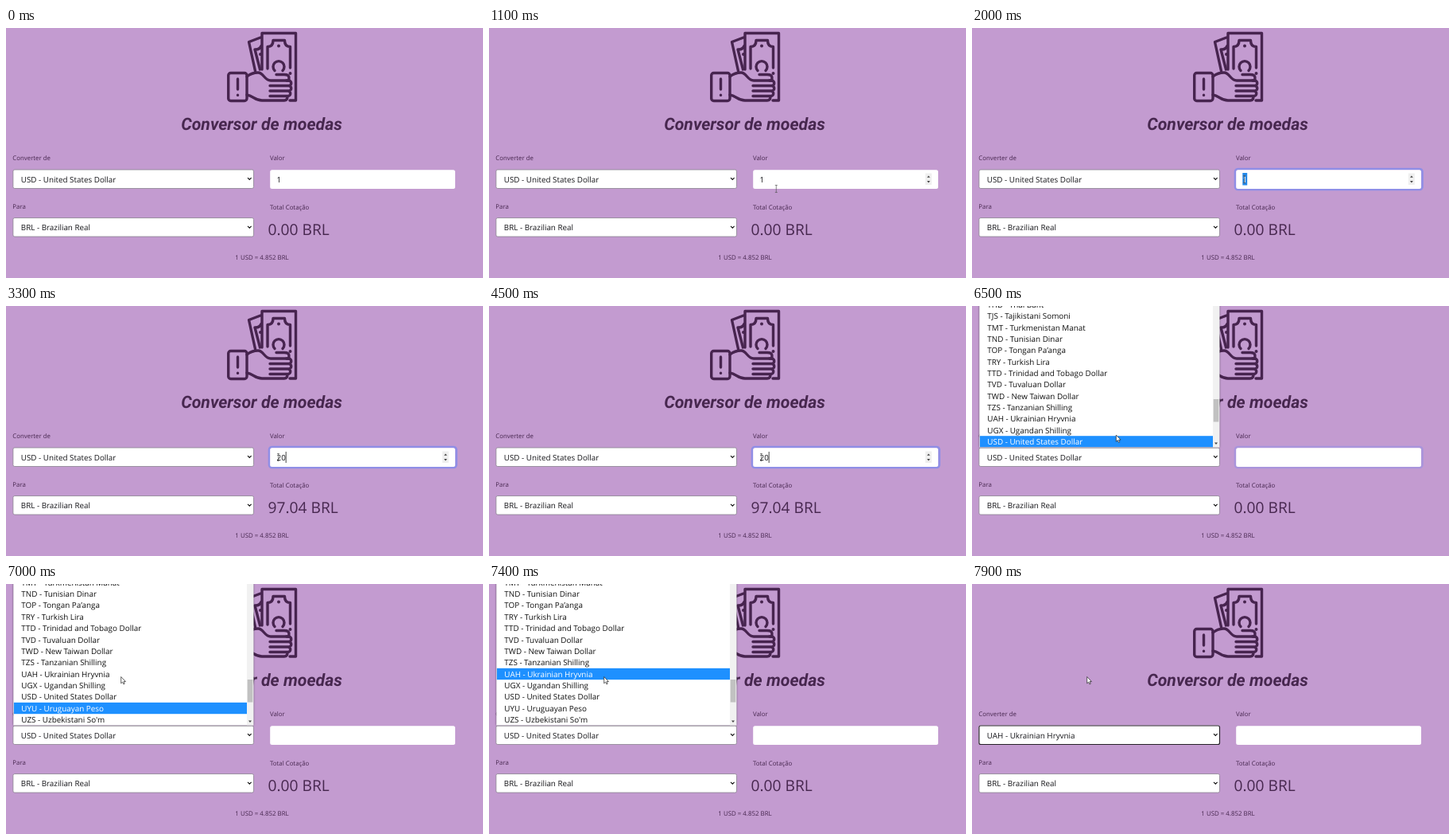
An HTML page that plays this animation: 600x314 px, repeating every 8 s.

```html
<!DOCTYPE html>
<html lang="pt-BR">
<head>
<meta charset="utf-8">
<title>Conversor de moedas</title>
<style>
html, body { margin: 0; width: 100%; height: 100%; overflow: hidden; background: #c39bd0; }
svg { display: block; width: 600px; height: 314px; }
text { font-family: "Open Sans", "Noto Sans", sans-serif; fill: #47274f; white-space: pre; text-rendering: geometricPrecision; }
.title { font: italic bold 21.25px Roboto, sans-serif; text-anchor: middle; }
.label { font-size: 7.85px; }
.rate { font-size: 7.9px; text-anchor: middle; }
.total { font-size: 19.2px; }
.field { font-size: 9.85px; fill: #16161a; }
.item { font-size: 9.9px; fill: #111; }
.item.on { fill: #fff; }
.icon { fill: none; stroke: #47244f; stroke-width: 3.4; stroke-linecap: round; stroke-linejoin: round; }
.chevron { fill: none; stroke: #111; stroke-width: 1.2; }
.select { fill: #fff; stroke: #8a8290; stroke-width: .8; }
.select.on { stroke: #262029; stroke-width: 1.2; filter: drop-shadow(0 0 .6px #fff); }
.panel { fill: #fff; filter: drop-shadow(0 .5px 1.2px #0009); }
</style>
</head>
<body>
<svg viewBox="0 0 600 314">
  <rect width="600" height="314" fill="#c39bd0"/>
  <g class="icon">
    <path d="M322 52V6.500H364.500V91H357"/>
    <path d="M329 51V23.500c5 0 7-3 7-8h14.500c0 5 2 8 7 8V50"/>
    <path d="M320 12L305.500 17.500L313.500 54M321 22.500q-2 5-8 4.500L319.500 52"/>
    <path d="M343 22.500v.1M320 33v.1M357.500 57v.1" stroke-width="4"/>
    <path d="M338 53.500a7 7 0 1 1 10 0"/>
    <rect x="279.700" y="56.500" width="23.300" height="35" rx="3"/>
    <path d="M291.500 64V77M291.500 84.300v.1"/>
    <path d="M303 61C308 57 311 56 317 56C324 56 325 66 333 66H355.500"/>
    <path d="M340 58.500H350q6 0 6 4t-3 3.500"/>
    <path d="M355.500 66a3.250 3.250 0 0 1 0 6.500H332M355.500 72.500a3.250 3.250 0 0 1 0 6.500H332M354.500 79a3.250 3.250 0 0 1 0 6.500H332"/>
    <path d="M303 84C311 85 313 91 322 91H350q4 0 4-5"/>
  </g>
  <text class="title" x="321.500" y="127.800">Conversor de moedas</text>
  <text class="label" x="8.300" y="166.300">Converter de</text>
  <text class="label" x="332" y="166.300">Valor</text>
  <text class="label" x="8.300" y="227.300">Para</text>
  <text class="label" x="332" y="227.800">Total Cotação</text>
  <text class="rate" x="322" y="291.200">1 USD = 4.852 BRL</text>
  <text class="total" id="total" x="329.500" y="260.300"></text>

  <rect id="fromBox" x="8.900" y="178" width="302.600" height="23.500" rx="2"/>
  <text class="field" id="from" x="18.800" y="193.500"></text>
  <path class="chevron" d="M304 188.200l2.300 2.300l2.300-2.300"/>
  <rect class="select" x="8.900" y="238.500" width="302.600" height="23.500" rx="2"/>
  <text class="field" x="18.800" y="254.200">BRL - Brazilian Real</text>
  <path class="chevron" d="M304 248.800l2.300 2.300l2.300-2.300"/>

  <rect id="ring" x="331" y="177" width="235.500" height="26" rx="3.500" fill="none" stroke="#8f8ee6" stroke-width="2.600"/>
  <rect x="332.200" y="178.200" width="232.800" height="23.800" rx="2.500" fill="#fff"/>
  <rect id="selection" x="340.300" y="182" width="5.900" height="15.500" fill="#2388e8"/>
  <text class="field" id="value" x="340.500" y="193.500"></text>
  <rect id="caret" y="183" width=".9" height="14" fill="#333"/>
  <g id="spinner">
    <rect x="548.800" y="182.500" width="8" height="14.500" fill="#efefef"/>
    <path d="M551 187.800l1.900-2.400l1.900 2.400zM551 192l1.900 2.400l1.900-2.400z" fill="#444"/>
  </g>

  <g id="list">
    <rect class="panel" x="9.300" y="-5" width="302" height="182.500"/>
    <svg x="9.700" y="0" width="293.300" height="177.300" viewBox="9.700 0 293.300 177.300">
      <rect id="highlight" x="9.700" width="293.300" height="14.350" fill="#1e90ff"/>
      <g id="items"></g>
    </svg>
    <rect x="303" y="0" width="8.200" height="177.300" fill="#f1f1f1"/>
    <rect id="thumb" x="303.700" width="6.600" height="28.500" fill="#c1c1c1"/>
    <path d="M305 171.500h4l-2 2.400z" fill="#444"/>
  </g>

  <path id="arrow" d="M0 0V8.300L1.900 6.600L3.200 9.400L4.500 8.800L3.300 6.100H5.800Z" fill="#fff" stroke="#222" stroke-width=".7"/>
  <path id="beam" d="M-1.500-4.500H1.500M0-4.500V4.500M-1.500 4.500H1.500" fill="none" stroke="#555" stroke-width=".7"/>
</svg>
<script>
const LOOP = 8000, ROW = 14.35, BLINK = 530;
const FOCUS = 1300, SELECT = 1900, OPEN = 6400, CLOSE = 7900;
const currencies = ["THB - Thai Baht", "TJS - Tajikistani Somoni", "TMT - Turkmenistan Manat",
  "TND - Tunisian Dinar", "TOP - Tongan Pa’anga", "TRY - Turkish Lira",
  "TTD - Trinidad and Tobago Dollar", "TVD - Tuvaluan Dollar", "TWD - New Taiwan Dollar",
  "TZS - Tanzanian Shilling", "UAH - Ukrainian Hryvnia", "UGX - Ugandan Shilling",
  "USD - United States Dollar", "UYU - Uruguayan Peso", "UZS - Uzbekistani So'm"];
const UAH = 10, USD = 12, UYU = 13;

// [time, typed text]
const typing = [[0, "1"], [2980, "2"], [3220, "20"], [4790, "2"], [5080, ""]];
// [time, x, y] of the pointer
const route = [[600, 378, 218], [800, 366, 208], [1000, 366, 208], [1300, 352, 190],
  [1800, 350, 190], [2000, 342.5, 190], [5300, 342.5, 190], [5600, 213, 220.5],
  [6000, 183, 190], [6400, 183, 188], [6500, 181.3, 162], [6700, 180, 160], [7000, 144.7, 116.5]];

const $ = id => document.getElementById(id);
const set = (id, attrs) => { for (const k in attrs) $(id).setAttribute(k, attrs[k]); };
const show = (id, on) => set(id, { visibility: on ? "visible" : "hidden" });
const clamp = v => Math.max(0, Math.min(1, v));
const latest = (steps, t) => steps.filter(s => s[0] <= t).pop();

const rows = currencies.map((name, i) => {
  const row = document.createElementNS("http://www.w3.org/2000/svg", "text");
  row.setAttribute("x", 19.3);
  row.setAttribute("y", 1.8 + i * ROW);
  row.textContent = name;
  return $("items").appendChild(row);
});

function pointerAt(t) {
  const next = route.findIndex(p => p[0] > t);
  if (next < 0) return route[route.length - 1].slice(1);
  if (next === 0) return [-50, -50];
  const [t0, x0, y0] = route[next - 1], [t1, x1, y1] = route[next];
  const k = (t - t0) / (t1 - t0);
  return [x0 + (x1 - x0) * k, y0 + (y1 - y0) * k];
}

function drawForm(t) {
  const [typedAt, value] = latest(typing, t);
  const focused = t >= FOCUS && t < OPEN;
  const selected = t >= SELECT && t < typing[1][0];
  const total = t < typing[1][0] ? 0 : Math.floor(value * 485.2) / 100;
  $("value").textContent = value;
  $("value").style.fill = selected ? "#fff" : "";
  $("total").textContent = total.toFixed(2) + " BRL";
  set("ring", { opacity: clamp((t - FOCUS) / 150) * (1 - clamp((t - OPEN) / 200)) });
  show("selection", selected);
  const blinkStart = Math.max(typedAt, FOCUS);
  show("caret", focused && !selected && Math.floor((t - blinkStart) / BLINK) % 2 === 0);
  set("caret", { x: 340.5 + value.length * 5.6 });
  show("spinner", t >= 1000 && t < OPEN);
  const chosen = t >= CLOSE;
  $("from").textContent = currencies[chosen ? UAH : USD];
  set("fromBox", { class: chosen ? "select on" : "select" });
}

function drawList(t) {
  const scroll = clamp((t - 6600) / 150) * 2 * ROW;
  const active = t < 6700 ? USD : t < 7100 ? UYU : UAH;
  show("list", t >= OPEN && t < CLOSE);
  set("items", { transform: `translate(0 ${-scroll})` });
  set("highlight", { y: active * ROW - 9 - scroll });
  set("thumb", { y: 117 + scroll / 9.5 });
  rows.forEach((row, i) => row.setAttribute("class", i === active ? "item on" : "item"));
}

function drawPointer(t) {
  const [x, y] = pointerAt(t);
  const overInput = x > 332 && y > 178 && y < 202;
  const transform = `translate(${x} ${y})`;
  set("arrow", { transform });
  set("beam", { transform });
  show("arrow", !overInput);
  show("beam", overInput);
}

function frame() {
  const t = performance.now() % LOOP;
  drawForm(t);
  drawList(t);
  drawPointer(t);
  requestAnimationFrame(frame);
}
frame();
</script>
</body>
</html>
```
